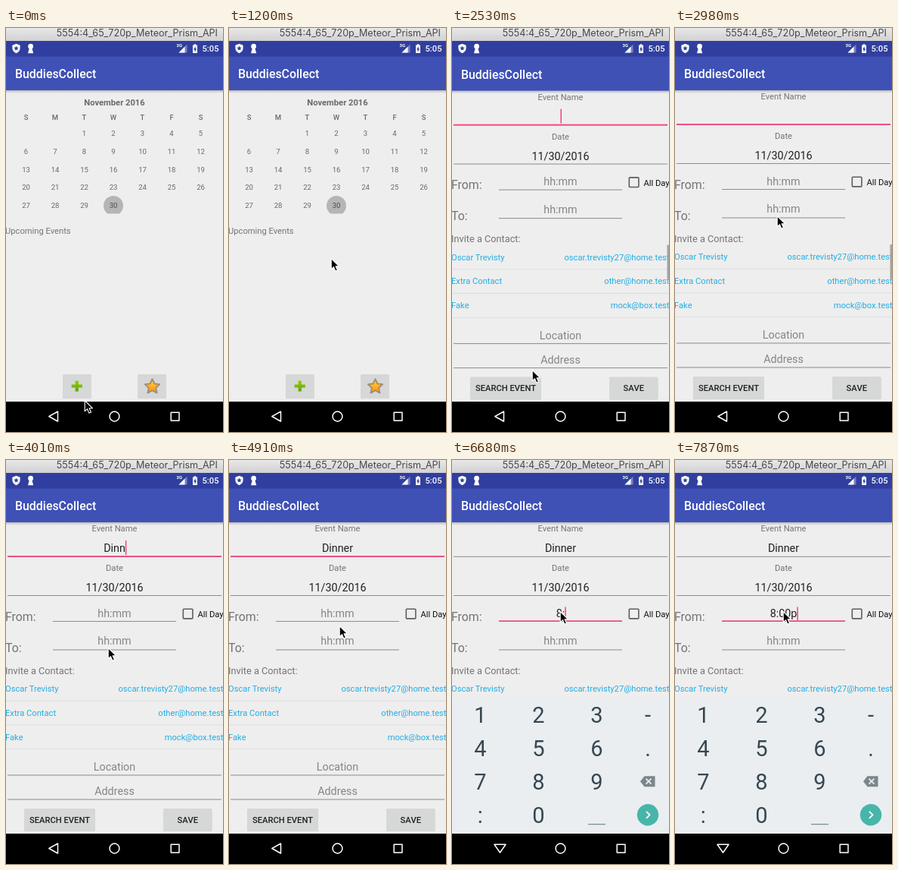
Animation of 287 by 532 pixels, one loop 8 s. Source, as an HTML page:

```html
<!DOCTYPE html>
<html lang="en">
<head>
<meta charset="utf-8">
<title>Calendar app demo</title>
<style>
html, body { margin: 0; width: 100%; height: 100%; overflow: hidden; background: #eee; }
svg { display: block; width: 100vw; height: 100vh; font-family: Roboto, "Noto Sans", sans-serif; }
</style>
</head>
<body>
<svg id="stage" viewBox="0 0 287 532" xmlns="http://www.w3.org/2000/svg"></svg>
<script>
const LOOP = 8000;
const GREY = '#747474', HINT = '#858585', INK = '#202020', PINK = '#f0437d', BLUE = '#24ade3';
const SMALL = 11.2, FIELD = 14.34, LARGE = 15.9;
const MID = 143.5;
const NAV_TOP = 492;

// y is the middle of the capitals
function text(str, x, y, size, fill, anchor = 'start', extra = '') {
  return `<text x="${x}" y="${(y + size * 0.355).toFixed(2)}" font-size="${size}" fill="${fill}" text-anchor="${anchor}" ${extra}>${str}</text>`;
}
const centred = (str, x, y, size, fill, extra) => text(str, x, y, size, fill, 'middle', extra);
const rect = (x, y, w, h, fill, extra = '') =>
  `<rect x="${x}" y="${y}" width="${w}" height="${h}" fill="${fill}" ${extra}/>`;
const path = (d, extra) => `<path d="${d}" ${extra}/>`;
const group = (id, body) => `<g id="${id}">${body}</g>`;

// Both lines share their bottom edge
const underline = (x1, x2, bottom) => rect(x1, bottom - 1, x2 - x1, 1, '#8c8c8c');
const focusLine = (id, x1, x2, bottom) => rect(x1, bottom - 1.7, x2 - x1, 1.7, PINK, `id="${id}"`);

function button(x, y, w, h, id = '') {
  return rect(x, y + 1, w, h, '#000', 'rx="1.5" opacity=".1"') +
    rect(x, y, w, h, '#d6d7d7', `rx="1.5" ${id && `id="${id}"`}`);
}

function star(cx, cy, r, extra) {
  const pts = [...Array(10)].map((_, i) => {
    const a = i * Math.PI / 5 - Math.PI / 2, q = i % 2 ? r * 0.48 : r;
    return `${(cx + q * Math.cos(a)).toFixed(2)},${(cy + q * Math.sin(a)).toFixed(2)}`;
  });
  return `<polygon points="${pts.join(' ')}" stroke-linejoin="round" ${extra}/>`;
}

function statusBar() {
  return rect(0, 0, 287, 17, 'url(#bar)') +
    text('5554:4_65_720p_Meteor_Prism_API', 280, 7, 12.6, '#484848', 'end', 'font-family="Inter, sans-serif"') +
    rect(0, 17, 287, 20.5, '#303f9f') +
    path('M13.5 20.8L18.6 22.7V26.5Q18.4 31 13.5 33.2Q8.6 31 8.4 26.5V22.7Z', 'fill="#fff"') +
    star(13.5, 26.8, 3.4, 'fill="#303f9f"') +
    '<circle cx="32.6" cy="24.2" r="3.4" fill="#fff"/>' +
    path('M31 26H34.2L36.2 33.2H29Z', 'fill="#fff"') +
    text('3G', 225.5, 23.2, 6, '#fff', 'start', 'font-weight="700"') +
    path('M239.5 21.5V32.5H228.5Z', 'fill="#fff" opacity=".35"') +
    path('M236.5 24.5V32.5H228.5Z', 'fill="#fff"') +
    path('M247 22.5H248.8V21.2H251.2V22.5H253V33H247Z', 'fill="#fff"') +
    path('M250.6 24L248 28.4H249.6V31.8L252.2 27.2H250.6Z', 'fill="#303f9f"') +
    text('5:05', 259.5, 27.3, SMALL, '#fff', 'start', 'font-weight="500"');
}

// One activity window: body, title bar and its shadow
function page(id, body) {
  return group(id, rect(0, 82, 287, NAV_TOP - 82, '#eee') + body +
    rect(0, 82, 287, 4, 'url(#shade)') + rect(0, 37, 287, 45, '#3f51b5') +
    text('BuddiesCollect', 12, 60.5, LARGE, '#fff', 'start', 'font-weight="500"'));
}

function calendar() {
  const colX = c => 26.5 + 38.5 * c, rowY = r => 139 + 23.7 * r;
  let out = centred('November 2016', MID, 98.5, SMALL, '#6a6a6a', 'font-weight="700"') +
    '<circle cx="142" cy="234" r="13" fill="#b5b5b5" clip-path="url(#grid)"/>';
  [...'SMTWTFS'].forEach((d, c) => out += centred(d, colX(c), 118, 9.5, '#6a6a6a', 'font-weight="500"'));
  for (let day = 1; day <= 30; day++) {
    const cell = day + 1;
    out += centred(day, colX(cell % 7), rowY(Math.floor(cell / 7)), 9.56, day === 30 ? '#4c4c4c' : '#686868');
  }
  return out + text('Upcoming Events', -1, 267, SMALL, GREY) +
    button(75, 456, 38, 31, 'addButton') + button(174, 456, 38, 31) +
    path('M91.6 464.5H95.9V469.4H100.8V473.6H95.9V478.5H91.6V473.6H86.7V469.4H91.6Z', 'fill="url(#green)"') +
    star(193.5, 472.3, 10, 'fill="#fff" stroke="#8d8d8d" stroke-width="2"') +
    star(193.5, 472.3, 8.2, 'fill="url(#gold)" stroke="#f08a12" stroke-width=".8"');
}

function form() {
  const contacts = [
    ['Oscar Trevisty', 'oscar.trevisty27@home.test'],
    ['Extra Contact', 'other@home.test'],
    ['Fake', 'mock@box.test']
  ];
  let out = centred('Event Name', MID, 90.3, SMALL, GREY) +
    centred('', MID, 116, FIELD, INK, 'id="name"') +
    underline(2, 285, 127.8) + focusLine('nameLine', 2, 285, 127.8) +
    centred('Date', MID, 142, SMALL, GREY) +
    centred('11/30/2016', MID, 168, FIELD, INK) + underline(2, 285, 179) +
    text('From:', -1, 206, LARGE, GREY) +
    centred('hh:mm', MID, 201.8, FIELD, HINT, 'id="from"') +
    underline(62, 225, 213) + focusLine('fromLine', 62, 225, 213) +
    '<rect x="234.3" y="196.3" width="12.6" height="12.6" rx="1" fill="none" stroke="#5e5e5e" stroke-width="1.6"/>' +
    text('All Day', 253.5, 203, SMALL, '#111') +
    text('To:', -1, 247, LARGE, GREY) +
    centred('hh:mm', MID, 238.3, FIELD, HINT) + underline(62, 225, 250.5) +
    text('Invite a Contact:', -1, 277, 12.75, GREY);
  contacts.forEach(([who, mail], i) => {
    const y = 301 + 31.8 * i;
    out += text(who, -1, y, SMALL, BLUE) + text(mail, 287.5, y, SMALL, BLUE, 'end') +
      rect(0, y + 15.7, 287, 0.9, '#dcdcdc');
  });
  return out +
    centred('Location', MID, 404, FIELD, HINT) + underline(2, 285, 415.5) +
    centred('Address', MID, 436.3, FIELD, HINT) + underline(2, 285, 447.5) +
    button(24, 459, 94, 29) + button(208, 459, 64.5, 29) +
    centred('SEARCH EVENT', 71, 473.8, SMALL, INK, 'font-weight="500"') +
    centred('SAVE', 240.3, 473.8, SMALL, INK, 'font-weight="500"') +
    rect(284.5, 285, 3, 45, '#a0a0a0', 'id="scrollbar"') +
    rect(0, 106, 1.5, 19, PINK, 'id="nameCaret"') +
    rect(0, 193.5, 1.5, 17.5, PINK, 'id="fromCaret"');
}

function navBar() {
  const line = 'fill="none" stroke="#fff" stroke-width="1.5" stroke-linejoin="round"';
  return rect(0, NAV_TOP, 287, 532 - NAV_TOP, '#000') +
    path('M56.8 511.5L68.5 505V518Z', `id="back" ${line}`) +
    path('M56 506.3H71L63.5 517Z', `id="hide" ${line}`) +
    `<circle cx="143.5" cy="511.5" r="6.4" ${line}/>` +
    `<rect x="218.2" y="506.2" width="10.8" height="10.8" ${line}/>`;
}

function keyboard() {
  const colX = [37.3, 114.3, 191.3, 259];
  let out = rect(0, 314.5, 287, NAV_TOP - 314.5, '#eaeef1');
  ['123-', '456.', '789', ':0'].forEach((row, r) =>
    [...row].forEach((key, c) => out += centred(key, colX[c], 335.2 + 44 * r, 29, '#37474f')));
  return out +
    rect(180, 479, 23, 1.3, '#7d8f99') +
    path('M249 423.2L254.5 416.2H268.5V430.2H254.5Z', 'fill="#7c868b"') +
    path('M256.5 419.7L263.5 426.7M263.5 419.7L256.5 426.7', 'stroke="#eaeef1" stroke-width="1.7"') +
    '<circle cx="259" cy="467.3" r="14.2" fill="#48b5aa"/>' +
    path('M257 462.8L261.5 467.3L257 471.8', 'fill="none" stroke="#fff" stroke-width="1.8"');
}

const stops = (id, a, b, alpha = 1) =>
  `<linearGradient id="${id}" x2="0" y2="1"><stop stop-color="${a}" stop-opacity="${alpha}"/><stop offset="1" stop-color="${b}" stop-opacity="${alpha === 1 ? 1 : 0}"/></linearGradient>`;

const stage = document.getElementById('stage');
stage.innerHTML =
  '<defs>' + stops('bar', '#e9e8e9', '#d2d1d2') + stops('shade', '#000', '#000', 0.22) +
  stops('green', '#92cf10', '#62a500') + stops('gold', '#ffd83a', '#f7931e') +
  '<clipPath id="grid"><rect y="84" width="287" height="160.5"/></clipPath></defs>' +
  rect(0, 0, 287, 532, '#eee') +
  page('calendar', calendar()) + page('form', form()) +
  statusBar() + navBar() + group('keyboard', keyboard()) +
  path('M-.8 -.5V13.7L2.5 10.7L4.9 16.1L7.5 15L5.1 9.7H9.4Z', 'id="pointer" fill="#000" stroke="#fff" stroke-width="1.1" stroke-linejoin="round"');

const el = {};
stage.querySelectorAll('[id]').forEach(n => el[n.id] = n);

// Each track: [start ms, value...], held until the next entry
const pointerTrack = [
  [0, 105, 491], [150, 107, 500], [300, 109, 509],
  [900, 113, 488], [1050, 126, 395], [1200, 136, 304], [1350, 127, 350],
  [1490, 106, 425], [1640, 89, 462], [1790, 86, 469], [1940, 96, 466],
  [2380, 99, 489], [2530, 107, 451], [2680, 115, 392], [2830, 130, 290], [2980, 136, 248],
  [4610, 139, 240], [4760, 144, 228], [4910, 147, 219],
  [5050, 147, 212], [5200, 146, 205], [5340, 144, 200]
];
const formTrack = [[0, 0, 0], [2380, 0.6, 22], [2530, 1, 0.6], [2680, 1, 0]];
const scrollTrack = [[0, 0.95], [3420, 0.45], [3570, 0]];
const nameTrack = [[0, ''], ...[3570, 3720, 3870, 4010, 4160, 4310].map((t, i) => [t, 'Dinner'.slice(0, i + 1)])];
const fromTrack = [[0, ''], [6080, '8'], [6530, '8:'], [7280, '8:0'], [7420, '8:00'], [7870, '8:00p']];
const nameCaretTrack = [[0, 1], [2980, 0], [3420, 1], [4910, 0], [5340, 1], [5490, 0]];
const fromCaretTrack = [[0, 0], [5490, 1], [7130, 0], [7280, 1]];
const keyTrack = [[0, 0, 0], [5640, 0.9, 3.5], [5790, 1, 0]];

function at(track, t) {
  let hit = track[0];
  for (const row of track) if (row[0] <= t) hit = row;
  return hit.slice(1);
}
const show = (node, on) => node.setAttribute('opacity', Number(on));
const move = (node, x, y) => node.setAttribute('transform', `translate(${x} ${y})`);

function draw(t) {
  const [px, py] = at(pointerTrack, t);
  move(el.pointer, px, py);
  el.addButton.setAttribute('fill', t >= 2230 ? '#c9c9c9' : '#d6d7d7');

  const [formAlpha, formY] = at(formTrack, t);
  show(el.form, formAlpha);
  move(el.form, 0, formY);
  show(el.scrollbar, at(scrollTrack, t)[0]);

  const [name] = at(nameTrack, t), [from] = at(fromTrack, t);
  el.name.textContent = name;
  el.from.textContent = from || 'hh:mm';
  el.from.setAttribute('fill', from ? INK : HINT);
  const nameHalf = name ? el.name.getComputedTextLength() / 2 : 0;
  const fromHalf = el.from.getComputedTextLength() / 2;
  el.nameCaret.setAttribute('x', MID + nameHalf);
  el.fromCaret.setAttribute('x', from ? MID + fromHalf : MID - fromHalf);
  show(el.nameCaret, at(nameCaretTrack, t)[0]);
  show(el.fromCaret, at(fromCaretTrack, t)[0]);

  const fromFocus = t >= 5490;
  show(el.nameLine, !fromFocus);
  show(el.fromLine, fromFocus);

  const [keyAlpha, keyY] = at(keyTrack, t);
  show(el.keyboard, keyAlpha);
  move(el.keyboard, 0, keyY);
  show(el.back, keyAlpha === 0);
  show(el.hide, keyAlpha > 0);
}

const begin = performance.now();
function tick() {
  draw((performance.now() - begin) % LOOP);
  requestAnimationFrame(tick);
}
tick();
</script>
</body>
</html>
```
